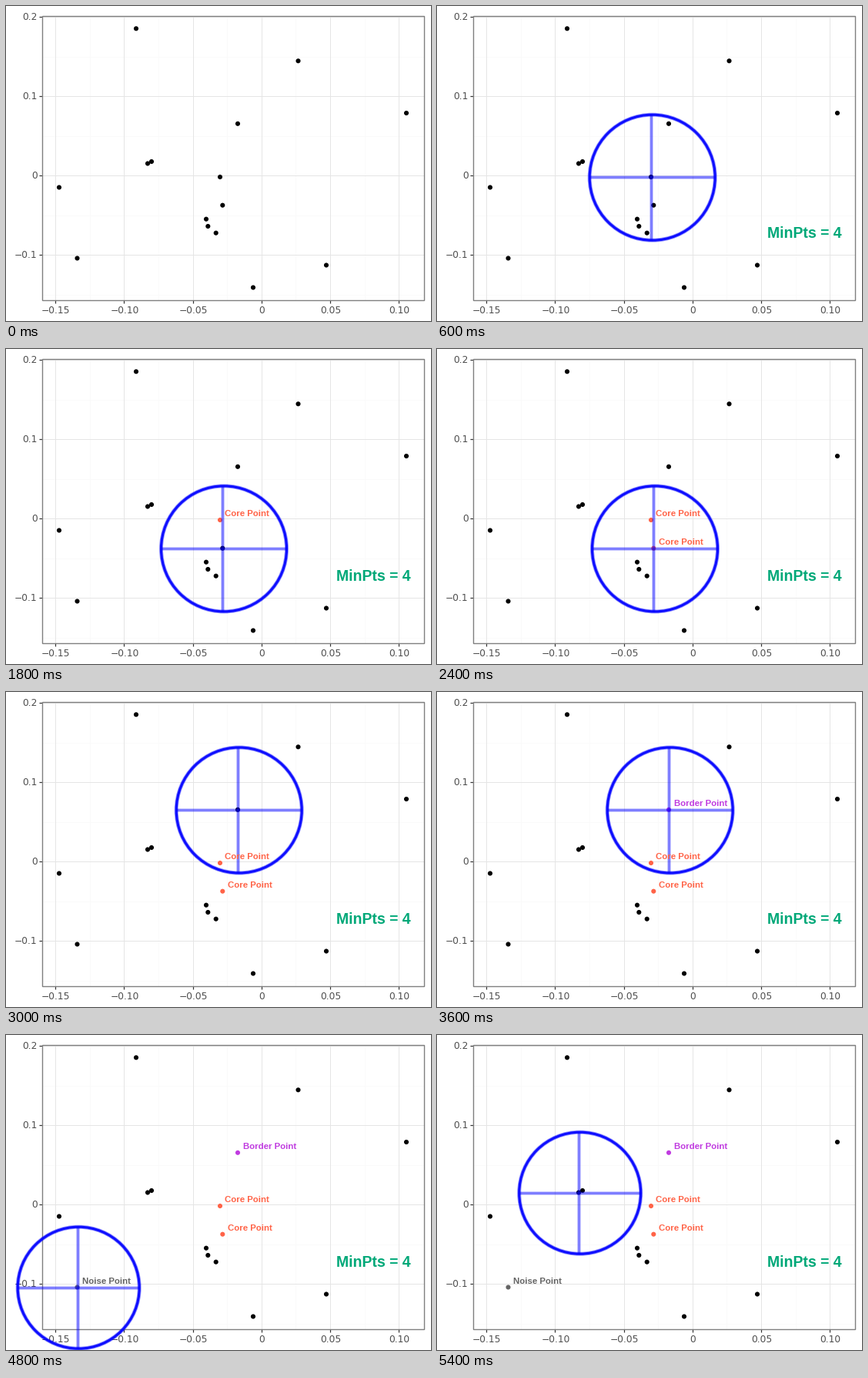
Animation, 552 px wide and 409 px high, one loop 6000 ms. Source, as a matplotlib script:

```python
import matplotlib.pyplot as plt
from matplotlib.animation import FuncAnimation
from matplotlib.patches import Circle, Rectangle

W, H, DPI = 552, 409, 72          # at 72 dpi one point is one pixel
STEPS, STEP_MS = 10, 600
LEFT, RIGHT, TOP, BOTTOM = 47, 543, 13, 382

LABEL_FONT = dict(family="Liberation Sans", weight="bold", va="baseline")
TICK_FONT = dict(family="DejaVu Sans", size=12.2, color="#4d4d4d", va="baseline")
GRID, FAINT, TICK, GREEN = "#e5e5e5", "#fafafa", "#333333", "#00a878"

# the first points are scanned in this order
POINTS = [(278, 222), (281.3, 258.7), (301, 152.8), (92.5, 327.5), (184, 204.5),
          (169, 29.3), (379.5, 71.3), (520, 139), (189, 202), (69, 235.5),
          (260, 276.7), (262.3, 286), (272.7, 294.7), (416, 336.5), (321, 365.5)]
CLASSES = [("Core Point", "#ff6347"), ("Core Point", "#ff6347"),
           ("Border Point", "#c03be0"), ("Noise Point", "#646464")]

fig = plt.figure(figsize=(W / DPI, H / DPI), dpi=DPI, facecolor="white")
ax = fig.add_axes([0, 0, 1, 1])
ax.set_xlim(0, W)
ax.set_ylim(H, 0)
ax.axis("off")


def line(xs, ys, color, width, z):
    return ax.plot(xs, ys, color=color, lw=width, zorder=z,
                   solid_capstyle="butt")[0]


def tick_text(value, digits):
    text = f"{value:.{digits}f}" if abs(value) > 1e-9 else "0"
    return text.replace("-", "\u2212")


def draw_panel():
    for i in range(6):
        x = 64.2 + 89.2 * i
        line([x, x], [TOP, BOTTOM], GRID, 1, 1)
        line([x, x], [BOTTOM, BOTTOM + 4], TICK, 1.2, 2)
        ax.text(x + 0.5, 399, tick_text(-0.15 + 0.05 * i, 2), ha="center",
                **TICK_FONT)
        if i < 5:
            line([x + 44.6] * 2, [TOP, BOTTOM], FAINT, 1, 0)
    for i in range(4):
        y = 14 + 103 * i
        line([LEFT, RIGHT], [y, y], GRID, 1, 1)
        line([LEFT - 4, LEFT], [y, y], TICK, 1.2, 2)
        ax.text(40.5, y + 4, tick_text(0.2 - 0.1 * i, 1), ha="right", **TICK_FONT)
        line([LEFT, RIGHT], [y + 51.5] * 2, FAINT, 1, 0)
    ax.add_patch(Rectangle((LEFT, TOP), RIGHT - LEFT, BOTTOM - TOP,
                           fc="none", ec="#7f7f7f", lw=1.4, zorder=3))


draw_panel()
dots = [ax.add_patch(Circle(xy, 3.05, fc="black", ec="none", zorder=4))
        for xy in POINTS]
labels = [ax.text(x + 6.5, y - 4.6, text, size=11.4, color=color, zorder=7,
                  **LABEL_FONT)
          for (x, y), (text, color) in zip(POINTS, CLASSES)]
min_pts = ax.text(429, 301, "MinPts = 4", size=19.5, color=GREEN,
                  zorder=7, **LABEL_FONT)

# a wide pale stroke under a narrow strong one gives soft edges
rings = [ax.add_patch(Circle((0, 0), 1, fc="none", ec=(0, 0, 1, alpha), lw=lw,
                             zorder=6))
         for lw, alpha in [(5, 0.4), (3.2, 0.9)]]
arms = [(line([], [], (0, 0, 1, alpha), lw, 5), line([], [], (0, 0, 1, alpha), lw, 5))
        for lw, alpha in [(5, 0.2), (3, 0.38)]]


def place_scan(xy, r):
    x, y = xy
    cx, cy = x + 1.7, y + 0.7
    for ring in rings:
        ring.set_center((cx, cy))
        ring.set_radius(r)
    for across, down in arms:
        across.set_data([cx - r, cx + r], [y, y])
        down.set_data([x, x], [cy - r, cy + r])


def update(step):
    # odd steps move the ring to the next point, even steps classify it
    scanning = step > 0
    for artist in [min_pts, *rings, *sum(arms, ())]:
        artist.set_visible(scanning)
    if scanning:
        place_scan(POINTS[(step - 1) // 2], 81.5 if step < 7 else 79)
    for i, (label, (_, color)) in enumerate(zip(labels, CLASSES)):
        known = step >= 2 * i + 2
        label.set_visible(known)
        dots[i].set_facecolor(color if known else "black")
    return []


anim = FuncAnimation(fig, update, frames=STEPS, interval=STEP_MS,
                     init_func=lambda: update(0), repeat=True, repeat_delay=0)
plt.show()
```
